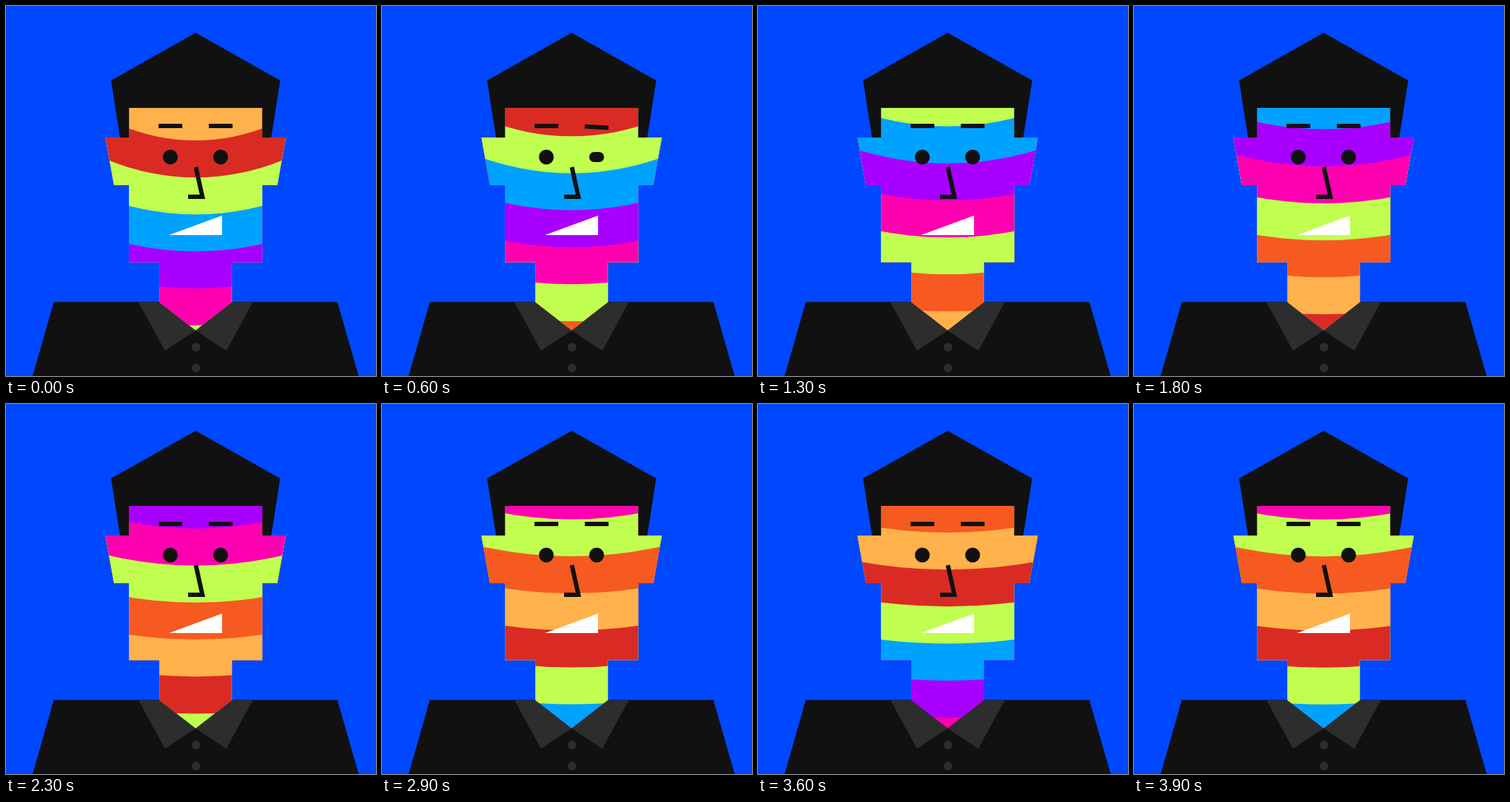
Write an HTML page with a canvas that moves like this. It is 512x512 px and loops after 4000 ms.

```html
<!DOCTYPE html>
<html lang="en">
<head>
<meta charset="utf-8">
<title>Rainbow face</title>
<style>
html, body { margin: 0; width: 100%; height: 100%; overflow: hidden; background: #0048ff; }
canvas { display: block; width: 512px; height: 512px; }
</style>
</head>
<body>
<canvas id="stage" width="512" height="512"></canvas>
<script>
const ctx = document.getElementById('stage').getContext('2d');
const LOOP = 4, STEP = 0.1, RETURN_AT = 3.858; // seconds
const SKY = '#0048ff', INK = '#111', COLLAR = '#2d2d2d', LIME = '#c0ff50';
const BANDS = ['#ffb24c', '#d92b24', LIME, '#00a2ff', '#a800ff', '#ff00b0', LIME, '#f65a20'];
const BAND_WIDTH = 51.2, FIRST_RADIUS = 266, RING_TOP = -80;
const AXIS = 262.4, CHEEK = 92.2, NECK = 50.2;

// Right halves as [distance from axis, y], top to bottom
const HAIR = [[0, 37], [117, 103], [104.7, 182], [CHEEK, 182], [CHEEK, 141]];
const SKIN = [[CHEEK, 141], [CHEEK, 182], [124.8, 182], [113, 248], [CHEEK, 248],
              [CHEEK, 354.5], [NECK, 354.5], [NECK, 410], [0, 449]];
const COAT = [[196.2, 409.5], [225.6, 512]];
const LAPEL = [[NECK, 410], [79, 410], [42.5, 477], [0, 449]];

const clamp = v => Math.max(0, Math.min(1, v));

// Rings climb at a gently varying speed, then snap back
function travelAt(t) {
  const rise = s => s * (93.7 + 1.75 * (s - 1.45) ** 2);
  if (t < RETURN_AT) return rise(t);
  return rise(RETURN_AT) * (LOOP - t) / (LOOP - RETURN_AT);
}

function trace(points) {
  ctx.beginPath();
  for (const [x, y] of points) ctx.lineTo(x, y);
}

function polygon(color, points) {
  trace(points);
  ctx.fillStyle = color;
  ctx.fill();
}

const side = (half, sign) => half.map(([dx, y]) => [AXIS + sign * dx, y]);
const mirrored = half => [...side(half, 1), ...side(half, -1).reverse()];

function disc(color, x, y, r) {
  ctx.beginPath();
  ctx.arc(x, y, r, 0, Math.PI * 2);
  ctx.fillStyle = color;
  ctx.fill();
}

function drawSkin(t) {
  ctx.save();
  trace(mirrored(SKIN));
  ctx.clip();
  const y = RING_TOP - travelAt(t);
  for (let k = 13; k >= 0; k--) {
    disc(BANDS[k % BANDS.length], AXIS, y, FIRST_RADIUS + k * BAND_WIDTH);
  }
  ctx.restore();
}

function drawEye(x, wink) {
  const size = 20.6, h = size - 16.6 * wink;
  ctx.fillStyle = INK;
  ctx.beginPath();
  ctx.roundRect(x - size / 2, 209 - h / 2, size, h, h / 2);
  ctx.fill();

  ctx.save();
  ctx.translate(x - 16.3, 166 + wink * 2);
  ctx.rotate(wink * 0.13);
  ctx.fillRect(0, -3, 32.8, 6);
  ctx.restore();
}

function drawFeatures(t) {
  drawEye(227.4, 0);
  drawEye(297, clamp(Math.min(t - 0.5, 1.2 - t) / 0.25));

  trace([[262.7, 223], [271.8, 264], [252, 264]]);
  ctx.strokeStyle = INK;
  ctx.lineWidth = 6;
  ctx.stroke();

  polygon('#fff', [[225.5, 317], [299, 290], [299, 317]]);
}

function draw(t) {
  ctx.fillStyle = SKY;
  ctx.fillRect(0, 0, 512, 512);
  polygon(INK, mirrored(COAT));
  drawSkin(t);
  for (const sign of [-1, 1]) polygon(COLLAR, side(LAPEL, sign));
  for (const y of [472, 501]) disc(COLLAR, 263, y, 6);
  polygon(INK, mirrored(HAIR));
  drawFeatures(t);
}

const start = performance.now();
function tick() {
  const t = (performance.now() - start) / 1000 % LOOP;
  draw(Math.floor(t / STEP) * STEP);
  requestAnimationFrame(tick);
}
tick();
</script>
</body>
</html>
```
